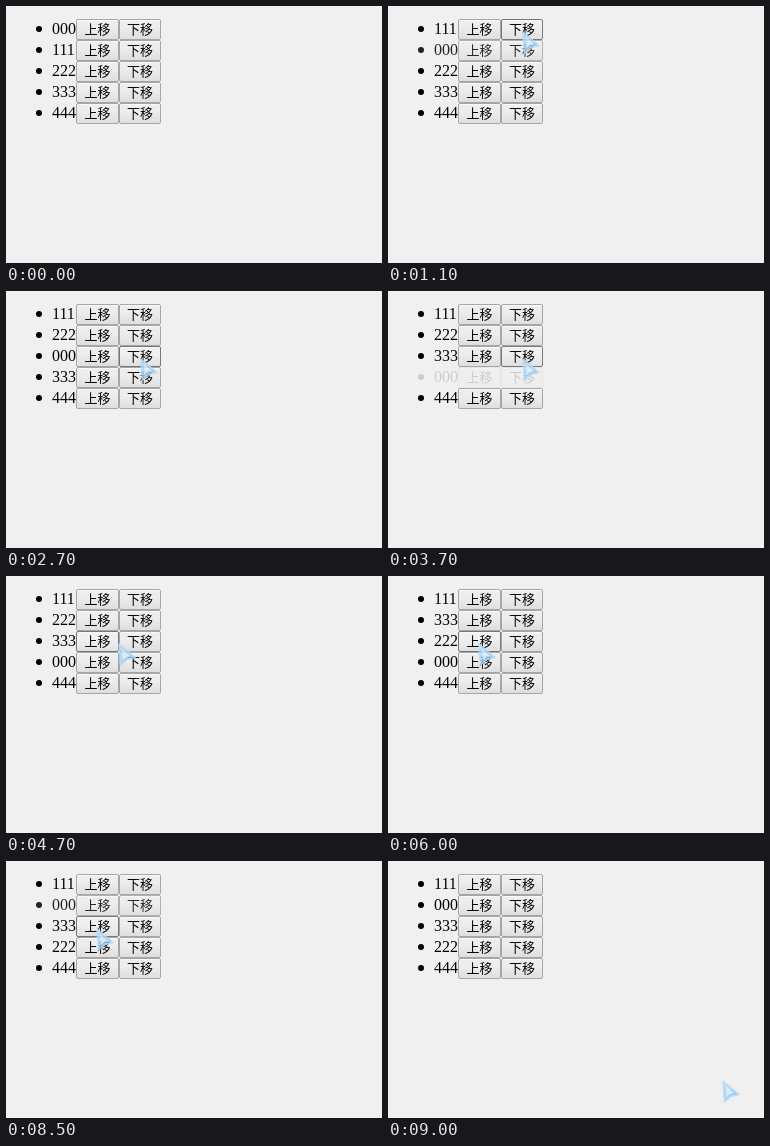
Write an HTML page that moves like this. It is 376 px wide and 257 px high and loops after 9.1 s.

```html
<!DOCTYPE html>
<html lang="zh">
<head>
<meta charset="utf-8">
<title>List reorder</title>
<style>
html, body { margin: 0; width: 100%; height: 100%; overflow: hidden; background: #f0f0f0; }
#stage { position: relative; width: 376px; height: 257px; overflow: hidden; }
.row { position: absolute; left: 0; width: 160px; height: 21px; }
.row::before { content: ""; position: absolute; left: 30px; top: 7px; width: 6px; height: 6px; border-radius: 50%; background: #000; }
.num { position: absolute; left: 46px; top: 0; font: 16px/20px "Liberation Serif", serif; }
.btn {
  position: absolute; top: 0; height: 21px; box-sizing: border-box;
  border: 1px solid #a6a6a6; border-radius: 2px;
  background: linear-gradient(#ededed 38%, #dedede);
  box-shadow: inset 0 1px 1px #fafafa;
  font: 13px/18px "Noto Sans CJK SC", "Noto Sans CJK", sans-serif; text-align: center; white-space: nowrap;
}
.up { left: 70px; width: 43px; }
.down { left: 113px; width: 42px; }
.hover { border-color: #777; background: linear-gradient(#f0f0f0 38%, #e0e0e0); }
#cursor { position: absolute; left: 0; top: 0; overflow: visible; opacity: .85; }
</style>
</head>
<body>
<div id="stage">
  <svg id="cursor" width="20" height="25">
    <defs>
      <linearGradient id="glass" x2="1" y2="1">
        <stop offset="0" stop-color="#c2e0f8"/>
        <stop offset="1" stop-color="#80bbee"/>
      </linearGradient>
    </defs>
    <path d="M1 1L17 14.5L9 16.5L2.5 22Z" fill="url(#glass)" stroke="#b5daf7" stroke-width="1.6" stroke-linejoin="round"/>
    <path d="M4 6L12 13L8 14L4.5 17Z" fill="#d6ecfc"/>
  </svg>
</div>
<script>
const LOOP = 9100, STEP = 100, TOP = 13, ROW_H = 21;
const ENTER = { x: 198, y: 93, arrive: STEP, travel: 0 };
const EXIT = { x: 334, y: 219, arrive: 9000, travel: 200 };
const UP = -1, DOWN = 1;

// Each click moves the item in `row` one place; the pointer gets there at `arrive`.
const click = (arrive, at, row, dir, fade = 800, travel = 400) => ({
  arrive, at, row, dir, fade, travel,
  x: dir === UP ? 90 : 134,
  y: TOP + row * ROW_H + 12
});
const clicks = [
  click(800, 1100, 0, DOWN, 800, 700),
  click(1800, 2000, 1, DOWN),
  click(2700, 3300, 2, DOWN),
  click(4900, 5200, 2, UP),
  click(6400, 7200, 3, UP, 500),
  click(7900, 7900, 2, UP)
];

const stage = document.getElementById("stage");
const cursor = document.getElementById("cursor");

function add(parent, cls, text = "") {
  const el = document.createElement("div");
  el.className = cls;
  el.textContent = text;
  parent.insertBefore(el, parent === stage ? cursor : null);
  return el;
}

const rows = Array.from({ length: 5 }, (_, i) => {
  const el = add(stage, "row");
  el.style.top = TOP + i * ROW_H + "px";
  return { el, num: add(el, "num"), up: add(el, "btn up", "上移"), down: add(el, "btn down", "下移") };
});

const smooth = p => p * p * (3 - 2 * p);

function pointerAt(t) {
  let { x, y } = ENTER;
  for (const stop of [...clicks, EXIT]) {
    const p = (t - stop.arrive) / stop.travel + 1;
    const k = smooth(Math.max(0, Math.min(1, p)));
    x += (stop.x - x) * k;
    y += (stop.y - y) * k;
  }
  return [x, y];
}

function draw(t) {
  const order = rows.map((_, i) => i), alpha = rows.map(() => 1);
  for (const { at, row, dir, fade } of clicks) {
    if (t < at) break;
    const to = row + dir;
    [order[row], order[to]] = [order[to], order[row]];
    // The moved item fades out and back in at its new place.
    const p = Math.min(1, (t - at + STEP) / fade);
    alpha[to] = (1 + Math.cos(2 * Math.PI * p)) / 2;
  }
  const [x, y] = pointerAt(t);
  const shown = t >= ENTER.arrive;
  const over = shown ? Math.floor((y + 3 - TOP) / ROW_H) : -1;
  rows.forEach((row, i) => {
    row.num.textContent = String(order[i]).repeat(3);
    row.el.style.opacity = alpha[i];
    row.up.classList.toggle("hover", over === i && x >= 70 && x < 113);
    row.down.classList.toggle("hover", over === i && x >= 113 && x < 155);
  });
  cursor.style.visibility = shown ? "visible" : "hidden";
  cursor.style.transform = `translate(${Math.round(x)}px, ${Math.round(y)}px)`;
}

const begin = performance.now();
function tick() {
  const t = (performance.now() - begin) % LOOP;
  draw(Math.floor(t / STEP) * STEP);
  requestAnimationFrame(tick);
}
tick();
</script>
</body>
</html>
```
